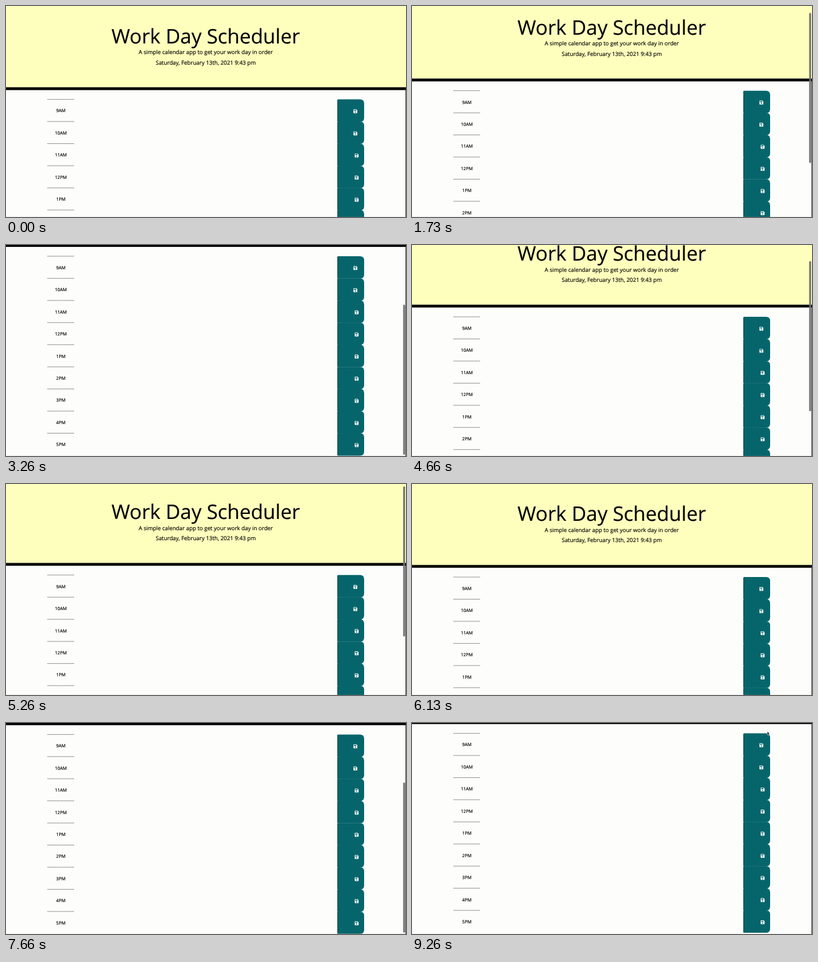
Animation, 640 px wide and 338 px high, one loop 9330 ms. Source, as an HTML page:

```html
<!DOCTYPE html>
<html lang="en">
<head>
<meta charset="utf-8">
<title>Work Day Scheduler</title>
<style>
  html, body { margin: 0; width: 100%; height: 100%; overflow: hidden; background: #fdfefc; }
  svg { display: block; width: 100%; height: 100%; }
  text { font-family: "Open Sans", sans-serif; text-anchor: middle; text-rendering: geometricPrecision; stroke: #000; stroke-width: .16; }
  .title { font-size: 32.1px; }
  .lead { font-size: 8.92px; }
  .hour { font-size: 7.1px; }
  .rule { stroke: #222; stroke-width: .8; stroke-dasharray: 1.4 1; }
  .button { fill: #06656b; }
  .edge { stroke: #03383c; stroke-width: .9; }
</style>
</head>
<body>
<svg viewBox="0 0 640 338">
  <defs>
    <path id="save" fill="#fff" fill-rule="evenodd"
      d="M-2.6-3.1H1.6L3.1-1.6V2.5Q3.1 3.1 2.5 3.1H-2.5Q-3.1 3.1-3.1 2.5V-2.5Q-3.1-3.1-2.6-3.1Z
         M-2.2-2.2V-.5H1.4V-2.2Z M-.9 1.3a.9.9 0 1 0 1.8 0a.9.9 0 1 0-1.8 0Z"/>
    <path id="button" class="button"
      d="M531.2 0H566.4Q573 0 573 6.6V29.3Q573 35.9 566.4 35.9H531.2L530.4 35.2V.8Z"/>
  </defs>
  <g id="page">
    <rect width="640" height="130.3" fill="#feffbc"/>
    <rect y="130.2" width="640" height="4.5"/>
    <rect x="639.2" y="134.7" width=".8" height="340" fill="#222"/>
    <text class="title" x="319.5" y="60">Work Day Scheduler</text>
    <text class="lead" x="319.6" y="77.4">A simple calendar app to get your work day in order</text>
    <text class="lead" x="319.6" y="93.5">Saturday, February 13th, 2021 9:43 pm</text>
    <g id="rows"></g>
  </g>
  <rect y="337.3" width="640" height=".7" fill="#888" opacity=".2"/>
  <rect id="thumb" x="635.5" width="3" height="240.5" rx="1.5" fill="#6f6f6f"/>
  <path id="cursor" d="M0 0V5.6L1.3 4.4L2.2 6.4L3.1 6L2.2 4H4Z" stroke="#fff" stroke-width=".5"/>
</svg>
<script>
const LOOP = 9330, STEP = LOOP / 140;
const byId = id => document.getElementById(id);

const hours = ["9AM", "10AM", "11AM", "12PM", "1PM", "2PM", "3PM", "4PM", "5PM"];
byId("rows").innerHTML = hours.map((hour, i) => {
  const iconX = i < 2 ? 559 : 561;
  return `<g transform="translate(0 ${149.6 + i * 35.44})">
    <path class="rule" d="M66.5 0H109"/>
    <text class="hour" x="87.7" y="20.9">${hour}</text>
    <use href="#button"/>
    <path class="edge" d="M530.8 .8V35.4"/>
    <use href="#save" x="${iconX}" y="19"/>
  </g>`;
}).join("");

// [time, scroll offset]
const scrollKeys = [
  [0, 0], [1340, 0], [1730, 13.8], [2330, 88], [3260, 131.6], [3600, 133],
  [3870, 133], [4660, 35], [5060, 8], [5600, .5], [6130, .5],
  [6800, 82], [7460, 128], [7930, 133], [LOOP, 133]
];

const slope = i => {
  const [a, b] = [scrollKeys[i], scrollKeys[i + 1]];
  return a && b ? (b[1] - a[1]) / (b[0] - a[0]) : 0;
};

// Harmonic mean of neighbouring slopes keeps the curve free of overshoot.
const tangent = i => {
  const before = slope(i - 1), after = slope(i);
  return before * after > 0 ? 2 * before * after / (before + after) : 0;
};

function scrollAt(t) {
  const i = scrollKeys.findIndex((key, n) => n === scrollKeys.length - 2 || t < scrollKeys[n + 1][0]);
  const [t0, y0] = scrollKeys[i], [t1, y1] = scrollKeys[i + 1];
  const span = t1 - t0, u = (t - t0) / span, v = 1 - u;
  return y0 * v * v * (1 + 2 * u) + y1 * u * u * (3 - 2 * u)
    + span * (tangent(i) * u * v * v - tangent(i + 1) * u * u * v);
}

const ramp = (t, from, to) => Math.min(1, Math.max(0, (t - from) / (to - from)));

function thumbOpacity(t) {
  if (t < 1390 || (t > 5930 && t < 6190)) return 0;
  return 1 - (t < 6000 ? ramp(t, 5660, 5930) : ramp(t, 8150, 8450));
}

function draw(t) {
  const scroll = scrollAt(t);
  byId("page").setAttribute("transform", `translate(0 ${-scroll})`);
  byId("thumb").setAttribute("y", 1 + scroll * 338 / 471);
  byId("thumb").setAttribute("opacity", thumbOpacity(t));
  const move = ramp(t, 8990, 9260);
  byId("cursor").setAttribute("transform", `translate(${562 + 6.5 * move} ${311 - 297.5 * move})`);
  byId("cursor").setAttribute("opacity", t > 8990 ? 1 : 0);
}

function tick() {
  const frame = Math.floor((performance.now() % LOOP) / STEP + .11);
  draw((frame % 140) * STEP);
  requestAnimationFrame(tick);
}
tick();
</script>
</body>
</html>
```
